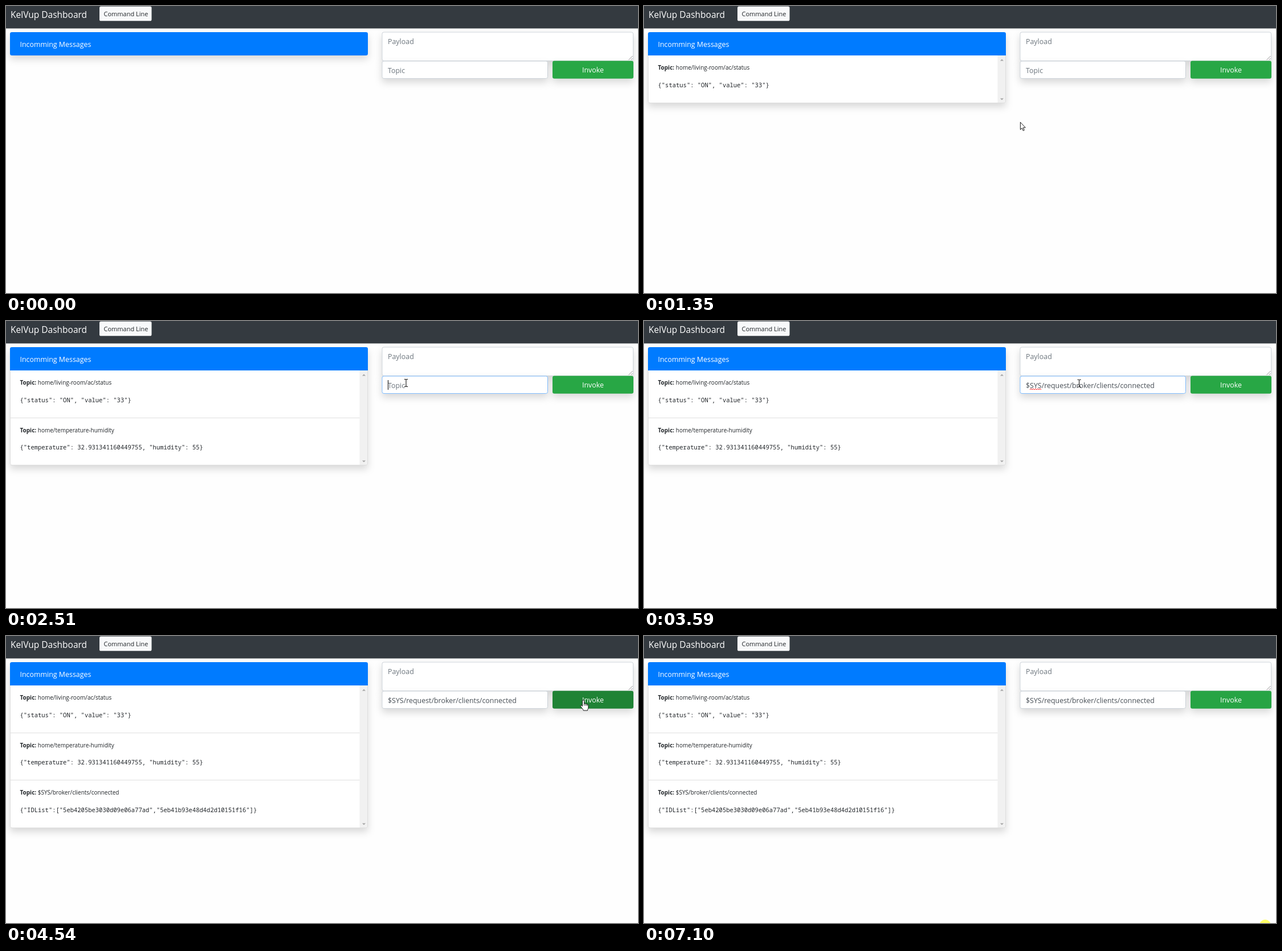
Write an HTML page that moves like this. It is 1109x505 px and loops after 7.18 s.

```html
<!DOCTYPE html>
<html lang="en">
<head>
<meta charset="utf-8">
<title>Dashboard</title>
<style>
  html, body { margin: 0; width: 100%; height: 100%; overflow: hidden; background: #fefefe; }
  svg { display: block; font: 12.42px "Open Sans", "Noto Sans", sans-serif; fill: #212529; }
  .white { fill: #fff; }
  .muted { fill: #6c757d; }
  .field { fill: #fff; stroke: #ced4da; }
  .shadow { filter: url(#shadow); }
  .small { font-size: 10px; }
  .mono { font: 10.5px "Noto Sans Mono", "DejaVu Sans Mono", monospace; }
  .arrows { fill: #a3a3a3; }
  .line { fill: none; stroke: #dfdfdf; }
  .pointer { fill: #fff; stroke: #000; stroke-width: .9; stroke-linejoin: round; }
</style>
</head>
<body>
<svg width="1109" height="505" viewBox="0 0 1109 505">
  <defs>
    <filter id="shadow" filterUnits="userSpaceOnUse" x="-30" y="0" width="1180" height="420" color-interpolation-filters="sRGB">
      <feDropShadow dx="0" dy="6.5" stdDeviation="6.5" flood-opacity=".15"/>
    </filter>
  </defs>

  <rect width="1109" height="39.5" fill="#343a40"/>
  <text class="white" x="8" y="20.5" font-size="15.5">KelVup Dashboard</text>
  <rect x="164" y=".7" width="91.5" height="25.6" rx="2.6" fill="#f8f9fa"/>
  <text x="171.5" y="18" font-size="11">Command Line</text>

  <rect id="card" class="shadow" x="7" y="46" width="628" rx="3.3" fill="#fff"/>
  <rect x="7" y="46" width="628" height="41" rx="3.3" fill="#007bff"/>
  <g id="list">
    <rect x="7" y="80" width="628" height="7" fill="#007bff"/>
    <rect id="bar" x="620.5" y="87" width="14" fill="#f1f1f1"/>
    <path class="arrows" d="M625 96.5h6l-3-3z"/>
    <path id="down" class="arrows" d="M625 0h6l-3 3z"/>
    <g id="rows"></g>
    <path id="frame" class="line"/>
  </g>
  <text class="white" x="24.5" y="71.5">Incomming Messages</text>

  <g class="shadow">
    <rect class="field" x="660" y="46" width="440.5" height="50.5" rx="3"/>
  </g>
  <path d="M1092.5 95l7-7M1096.5 95l3-3" stroke="#777" stroke-width=".8"/>
  <text class="muted" x="670" y="66.5">Payload</text>
  <g class="shadow">
    <rect id="input" class="field" x="660" y="97" width="290.5" height="30.5" rx="3"/>
  </g>
  <text id="topic" x="670" y="118"></text>
  <path id="squiggle" fill="none" stroke="#f00" stroke-width=".9"/>
  <rect id="caret" y="104" width="1" height="17" fill="#000"/>
  <rect id="button" class="shadow" x="959" y="96.6" width="142" height="31.2" rx="3.3"/>
  <text class="white" x="1030" y="117.2" text-anchor="middle">Invoke</text>

  <g id="mouse">
    <circle id="click" r="10" fill="#ff0" fill-opacity=".6"/>
    <path id="arrow" class="pointer" d="M.4 .5V13.5L3.3 10.8 5.3 15.4 7.3 14.5 5.3 10H9.3Z"/>
    <path id="beam" fill="none" stroke="#000" d="M-3-6.5h2l1 .8 1-.8h2M0-6V6M-3 6.5h2l1-.8 1 .8h2"/>
    <path id="hand" class="pointer" d="M-1.6 11V1.8a1.6 1.6 0 0 1 3.2 0V6.5c2-.6 2.7 0 2.8 .7 1.5-.4 2.3 0 2.5 .8 1.3-.2 2 .4 2 1.6v4c0 1.5-1.3 2.5-1.5 5H.2c-.3-2-2.4-4-4.8-7.2-.8-1.5 .6-2.5 1.8-1.4zM1.6 6.5V10M4.4 7.2v3M6.9 8v2.5"/>
  </g>
</svg>
<script>
const LOOP = 7180, ROW = 83.5, LIST_TOP = 87;
const messages = [
  [1120, "home/living-room/ac/status", '{"status": "ON", "value": "33"}'],
  [2430, "home/temperature-humidity", '{"temperature": 32.931341160449755, "humidity": 55}'],
  [4460, "$SYS/broker/clients/connected", '{"IDList":["5eb4205be3030d09e06a77ad","5eb41b93e48d4d2d10151f16"]}']
];
// Pointer moves: first change, last change, number of changes, destination
const moves = [
  [1120, 1350, 4, 660, 204],
  [1750, 2120, 6, 702, 109],
  [3440, 3920, 7, 1013, 112.5],
  [5940, 5940, 1, 1013, 113.5],
  [6030, 6250, 4, 1090, 497],
  [6400, 6650, 4, 1090, 509]
];
// Button colours: start, fade time, RGB
const tints = [
  [3760, 150, [33, 136, 56]],
  [4380, 150, [31, 131, 53]],
  [5940, 1, [33, 136, 56]],
  [7010, 100, [40, 167, 69]]
];

const $ = id => document.getElementById(id);
const set = (id, attrs) => { for (const k in attrs) $(id).setAttribute(k, attrs[k]); };
const show = (id, on) => { $(id).style.display = on ? "" : "none"; };
const within = (t, a, b) => t >= a && t < b;
const clamp = v => Math.min(1, Math.max(0, v));
const mix = (a, b, p) => a.map((v, i) => v + (b[i] - v) * p);
const rgb = c => `rgb(${c.map(Math.round)})`;
const rowTop = i => Math.round(LIST_TOP + i * ROW);

$("rows").innerHTML = messages.map(([, topic, body], i) => {
  const y = LIST_TOP + i * ROW;
  return `<g id="row${i}"><path class="line" d="M8 ${rowTop(i + 1) - .5}H620.5"/>
    <text class="small" x="24.5" y="${y + 25}"><tspan font-weight="700">Topic:</tspan> ${topic}</text>
    <text class="mono" x="24.5" y="${y + 55.5}">${body}</text></g>`;
}).join("");
set("squiggle", { d: "M677 121" + "l2-2l2 2".repeat(5) });

function pointerAt(t) {
  let pos = [655, 520];
  for (const [start, end, steps, x, y] of moves) {
    if (t < start) break;
    const step = Math.floor((t - start) / (end - start || 1) * (steps - 1)) + 1;
    const p = clamp(step / steps);
    pos = mix(pos, [x, y], p * p * (3 - 2 * p));
  }
  return pos;
}

function drawCard(t) {
  const count = messages.filter(m => t >= m[0]).length;
  const bottom = rowTop(count), height = bottom - LIST_TOP;
  messages.forEach((m, i) => show("row" + i, i < count));
  show("list", count);
  set("card", { height: 41 + height });
  set("bar", { height });
  set("down", { transform: `translate(0 ${bottom - 8.5})` });
  set("frame", { d: `M7.5 87V${bottom - 3}q0 2.5 3 2.5H632q2.5 0 2.5-2.5V87` });
}

function drawInput(t) {
  const filled = t >= 3040;
  $("topic").textContent = filled ? "$SYS/request/broker/clients/connected" : "Topic";
  $("topic").style.fill = filled ? "#495057" : "#6c757d";
  const focus = clamp((t - 2360) / 150) - clamp((t - 4380) / 150);
  $("input").style.stroke = rgb(mix([206, 212, 218], [128, 189, 255], focus));
  show("squiggle", within(t, 3040, 4460));
  show("caret", within(t, 2400, 2900) || within(t, 3040, 3540) || within(t, 4060, 4460));
  set("caret", { x: filled ? 897 : 670 });
}

function drawButton(t) {
  let color = [40, 167, 69];
  for (const [start, fade, next] of tints) color = mix(color, next, clamp((t - start) / fade));
  set("button", { fill: rgb(color) });
}

function drawMouse(t) {
  const [x, y] = pointerAt(t);
  const level = within(y, 97, 128);
  const beam = level && within(x, 660, 951), hand = level && within(x, 959, 1101);
  set("mouse", { transform: `translate(${x} ${y})` });
  show("beam", beam);
  show("hand", hand);
  show("arrow", !beam && !hand);
  show("click", within(t, 2350, 2510) || within(t, 4380, 4540) || t >= 7020);
}

function tick() {
  const t = performance.now() % LOOP;
  drawCard(t);
  drawInput(t);
  drawButton(t);
  drawMouse(t);
  requestAnimationFrame(tick);
}
tick();
</script>
</body>
</html>
```
